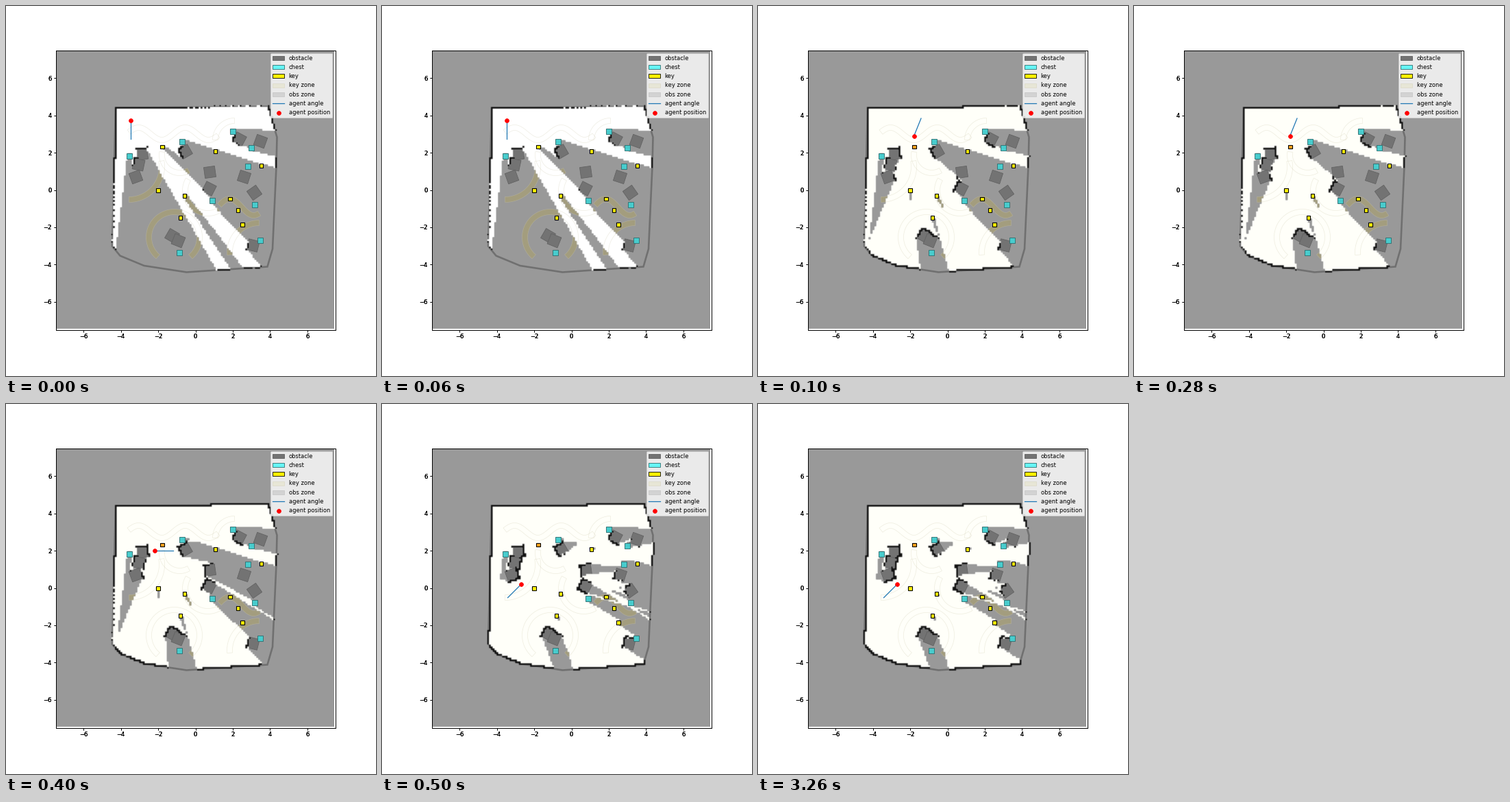
Write a matplotlib script that moves like this. It is 540 px wide and 540 px high and loops after 5.1 s.

```python
import numpy as np
import matplotlib.pyplot as plt
from matplotlib.animation import FuncAnimation
from matplotlib.patches import Patch, Polygon, Rectangle

SIZE, DPI = 540, 60
LEFT, TOP, SIDE = 73, 65, 408      # map area in pixels, y pointing down
CELLS, RAYS, SCANS = 150, 720, 4   # scans are taken along each move
CELL = SIDE / CELLS
PX = 72 / DPI                      # points per pixel
BLOCK, CHEST, KEY = 16, 8, 5.5     # side lengths

WALL = [(160.5, 149.2), (383, 147.2), (396, 192), (395, 235), (389.5, 355),
        (382, 381), (264, 389), (202, 379.5), (167, 365), (155.5, 351)]

# centre and turn in degrees
OBSTACLES = [(199, 217, -10), (194, 232, 12), (190, 250, -20),
             (262, 213, -30), (341, 195, 28), (372, 198, 20), (298, 243, -8),
             (297, 267, 27), (348, 250, 18), (363, 273, -35), (361, 350, 14),
             (243, 336, 30), (252, 343, 22)]
CHESTS = [(180.5, 219), (257, 198.5), (331.5, 183), (358, 207.5), (353, 234),
          (301, 284), (363.5, 290.5), (371.5, 342), (253.5, 360)]
KEYS = [(228.5, 206), (306, 212.5), (373, 233.5), (222.5, 269.5),
        (261, 277.5), (327.5, 282), (339, 298.5), (255, 309.5),
        (345.5, 319.5)]

# agent position and heading (degrees, clockwise from the right)
POSES = [((182.3, 167.2), 90), ((228.2, 190), -68),
         ((217.3, 214.2), 0), ((203.5, 263.7), 135)]
STARTS = [0, 1, 4, 5]              # first tick of each pose
TICKS, STEP_MS = 51, 100
REACH = 27.5


def box(x, y, side, turn=0):
    a = np.radians(turn)
    u = np.array([np.cos(a), np.sin(a)]) * side / 2
    v = np.array([-u[1], u[0]])
    return np.array([x, y]) + np.array([-u - v, u - v, u + v, v - u])


def arc(x, y, r, start, stop):
    a = np.radians(np.linspace(start, stop, 60))
    return np.stack([x + r * np.cos(a), y + r * np.sin(a)], axis=1)


def wave(start, stop, y, amp, crest, period):
    x = np.linspace(start, stop, 80)
    return np.stack([x, y - amp * np.cos(2 * np.pi * (x - crest) / period)],
                    axis=1)


def cross(a, b):
    return a[..., 0] * b[..., 1] - a[..., 1] * b[..., 0]


def mark(grid, pts):
    col, row = np.rint((pts - [LEFT, TOP]) / CELL).astype(int).T
    grid[row, col] = True


def scan(origin, solids, items, free, occ):
    """Add what is seen from one place; only solids leave black cells."""
    shapes = [np.array(s) for s in solids + items]
    start = np.vstack(shapes)
    edge = np.vstack([np.roll(s, -1, axis=0) - s for s in shapes])
    hard = np.arange(len(start)) < sum(len(s) for s in solids)
    ang = np.arange(RAYS) * 2 * np.pi / RAYS
    rays = np.stack([np.cos(ang), np.sin(ang)], axis=1)
    rel = start - origin
    den = cross(rays[:, None], edge[None])
    den = np.where(np.abs(den) < 1e-9, 1e-9, den)
    t = cross(rel, edge)[None] / den
    u = cross(rel[None], rays[:, None]) / den
    t = np.where((t > 0) & (u >= 0) & (u <= 1), t, np.inf)
    for ray, k, dist in zip(rays, t.argmin(axis=1), t.min(axis=1)):
        mark(free, origin + np.arange(0, dist - 0.5, 0.5)[:, None] * ray)
        if hard[k]:
            mark(occ, (origin + dist * ray)[None])


def build_maps():
    solids = [WALL] + [box(x, y, BLOCK, a) for x, y, a in OBSTACLES]
    items = [box(*p, KEY) for p in KEYS] + [box(*p, CHEST) for p in CHESTS]
    free = np.zeros((CELLS, CELLS), bool)
    occ = np.zeros_like(free)
    maps = []
    last = np.array(POSES[0][0])
    for i, (pos, _) in enumerate(POSES):
        # the first key is picked up on the first move
        left = items[1:] if i else items
        for s in np.arange(1, SCANS + 1) / SCANS:
            scan(last + s * (np.array(pos) - last), solids, left, free, occ)
        last = np.array(pos)
        img = np.full((CELLS, CELLS, 4), 0.6)
        img[..., 3] = 0
        img[free] = (1, 1, 0.98 if i else 1, 1)
        img[occ] = (0.07, 0.07, 0.07, 1)
        maps.append(img)
    return maps


fig = plt.figure(figsize=(SIZE / DPI, SIZE / DPI), dpi=DPI, facecolor="white")
rect = [(LEFT - 0.5) / SIZE, 1 - (TOP + SIDE - 0.5) / SIZE,
        SIDE / SIZE, SIDE / SIZE]
ax = fig.add_axes(rect)

# stacked scales give the heavy tick labels
for _ in range(3):
    scale = fig.add_axes(rect)
    scale.patch.set_visible(False)
    ticks = range(-6, 7, 2)
    scale.set(xlim=(-7.5, 7.5), ylim=(-7.5, 7.5), xticks=ticks, yticks=ticks)


def shape(points, z, **style):
    return ax.add_patch(Polygon(points, closed=True, zorder=z, **style))


# cells are centred on grid points, so the map sits half a cell up and left
x0, y0 = LEFT - CELL / 2, TOP - CELL / 2
ax.add_patch(Rectangle((x0, y0), SIDE, SIDE, fc="#999999", ec="none",
                       zorder=0))

zones = [
    wave(180, 310, 187, 9, 262, 68), wave(312, 370, 294, 12, 327, 70),
    arc(334, 196, 28, 180, 270), arc(254, 218, 26, 190, 60),
    arc(180, 235, 48, 90, -10), arc(295, 270, 33, 210, 60),
    arc(246, 338, 37, 130, 410), arc(370, 360, 43, 175, 270),
]
for curve in zones:
    slope = np.gradient(curve, axis=0)
    slope /= np.hypot(*slope.T)[:, None]
    side = np.stack([-slope[:, 1], slope[:, 0]], axis=1) * 4
    band = np.vstack([curve + side, (curve - side)[::-1]])
    shape(band, 1, fc="#a39d7e", ec="none")
    shape(band, 4, fill=False, ec="#cfcbb0", alpha=0.35, lw=0.7 * PX)

shape(WALL, 2, fill=False, ec="#707070", lw=2.6 * PX)
for x, y, turn in OBSTACLES:
    shape(box(x, y, BLOCK, turn), 2.5, fc="#737373", ec="#626262",
          lw=0.8 * PX)
for p in CHESTS:
    shape(box(*p, CHEST), 5, fc="#48cccd", ec="#2f6f70", lw=0.9 * PX)
key_marks = [shape(box(*p, KEY), 5, fc="#fff200", ec="black", lw=1.1 * PX)
             for p in KEYS]

maps = build_maps()
view = ax.imshow(maps[0], extent=(x0, x0 + SIDE, y0 + SIDE, y0),
                 aspect="auto", zorder=3)
heading, = ax.plot([], [], color="#1f77b4", lw=1.5, zorder=7,
                   label="agent angle")
agent = ax.scatter(*POSES[0][0], s=48, color="red", lw=1, zorder=8,
                   label="agent position")

swatches = [
    Patch(fc="#737373", ec="#5c5c5c", label="obstacle"),
    Patch(fc="#66f5f5", ec="#2f6f70", label="chest"),
    Patch(fc="#fff200", ec="black", label="key"),
    Patch(fc="#e7e6d6", ec="#dedccb", label="key zone"),
    Patch(fc="#d3d3d3", ec="#c8c8c8", label="obs zone"),
]
ax.legend(handles=swatches + [heading, agent],
          loc="upper right").set_zorder(10)
ax.set(xlim=(LEFT, LEFT + SIDE), ylim=(TOP + SIDE, TOP), xticks=[], yticks=[])


def update(tick):
    i = sum(tick >= s for s in STARTS) - 1
    (x, y), turn = POSES[i]
    a = np.radians(turn)
    view.set_data(maps[i])
    heading.set_data([x, x + REACH * np.cos(a)], [y, y + REACH * np.sin(a)])
    agent.set_offsets([(x, y)])
    key_marks[0].set_facecolor("#ffa51f" if i else "#fff200")
    return view, heading, agent, key_marks[0]


anim = FuncAnimation(fig, update, frames=TICKS, interval=STEP_MS, repeat=True,
                     repeat_delay=0, blit=False)
plt.show()
```
